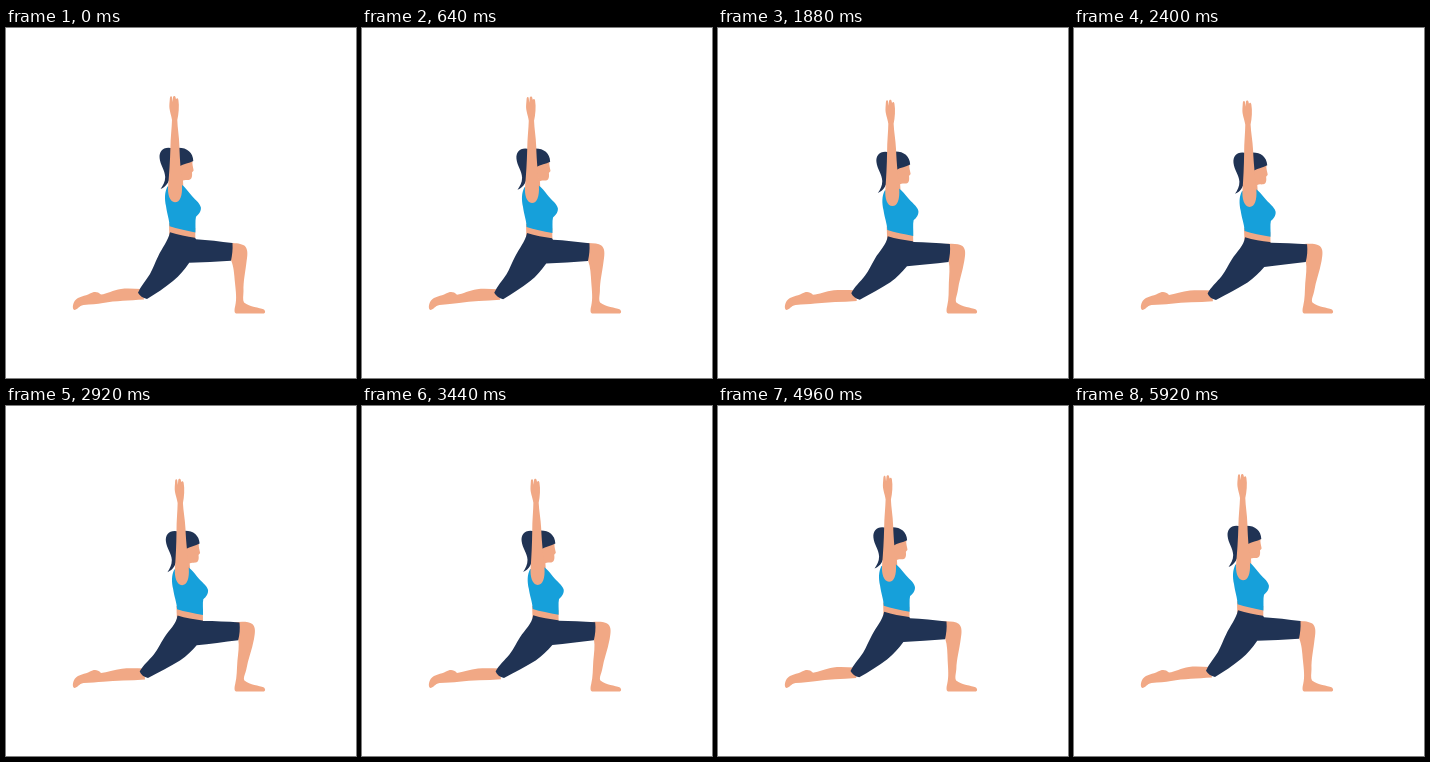
An HTML page for the animation above (6 s loop, 350 by 350 pixels).

```html
<!DOCTYPE html>
<html lang="en">
<head>
<meta charset="utf-8">
<title>Low lunge</title>
<style>
  html, body { margin: 0; width: 100%; height: 100%; overflow: hidden; background: #fff; }
  svg { display: block; width: 100%; height: 100%; }
  .skin { fill: #f1a885; }
  .navy { fill: #203354; }
  .top { fill: #16a0da; }
</style>
</head>
<body>
<svg viewBox="0 0 350 350">
  <path id="backLeg" class="skin"/>
  <path id="frontLeg" class="skin"/>
  <g id="body">
    <!-- ponytail, face, cap of hair -->
    <path class="navy" d="M167 120.5C157.5 118 153 123 153.6 130C154.2 137 159 142 159.2 149C159.2 154 157 157.5 154.6 161C161 158.8 163.8 152 165 146Z"/>
    <path class="skin" d="M172 135L186.5 133C186 136.5 187.2 139 187.6 142.2C187.5 143.4 186.2 143.6 186 144.6C186.4 148 186 151.6 183 151.9C180.5 152.2 178.5 151.4 177 152.6L177.4 160H170Z"/>
    <path class="navy" d="M165 121C177 117.5 187 122 187.3 133C183 135.5 178 135.5 173 138.5H165Z"/>
    <!-- waist and shirt -->
    <path class="skin" d="M163 195L189.3 200L189.3 213L163.3 209Z"/>
    <path class="top" d="M161.5 158.5C158.5 164 158.5 171 160 178C161 186 163.3 191 163.6 198.2C171 200.8 180 202.4 189.4 204.4C189.8 198 189 193 190 188.8C192.8 186.5 195.2 183.5 194.9 179.6C193.8 174.5 188 171 184.3 166C181.5 162.5 179 159 175.5 156.5Z"/>
    <!-- raised arm -->
    <path class="skin" d="M166 92C165.2 86 162.9 82 163.4 76L163.9 70C164.2 67.8 166 67.8 166.1 70L166.5 74L167 69.4C167.2 67.4 169.3 67.4 169.6 69.4L170 71.2C171 69.6 172.1 70.2 172.4 72C173.4 78 172.7 86 171.3 92C171.5 100 173.1 108 173.4 118C173.7 132 175.2 146 176 157C176.6 168 174 174.3 169 174.3C163.7 174 161.2 166 162.2 157C163.2 146 164 134 164.4 120C164.5 110 165.8 100 166 92Z"/>
  </g>
  <path id="pants" class="navy"/>
</svg>
<script>
  const STEP = 40, LOOP = 6000, HALF = 2960;

  // Each limb: upright pose and deepest pose, with the same path commands.
  const limbs = {
    backLeg: [
      "M136 261C129 261 122 260 115 261C107 262 101 266 95 266.6C91.5 263.2 87.5 263.5 84 265.6C79 268.4 72.5 268.2 68.8 272.8C66.3 277 66.3 281 68.3 282C71.2 282 73 277.8 77.5 277C85 276.5 91 276 97 275C110 272.6 123 272.6 138 271.5Z",
      "M138 262.5C131 262.5 123 262 116 262.7C108 263.5 101 266.6 95 266.9C91.5 263.2 87.5 263.5 84 265.6C79 268.4 72.5 268.2 68.8 272.8C66.3 277 66.3 281 68.3 282C71.2 282 73 277.8 77.5 277C85 276.5 91 276.4 97 275.8C110 274.2 124 274.6 139 273.4Z"
    ],
    frontLeg: [
      "M222 215C228 214.7 235 215.3 238.3 217.5C242 220.5 241.8 226 240.6 233C239.4 244 237.2 253 237.5 263C237.4 268 236.5 271.5 238 274.5C244 279 253 279.5 258 281.5C259.5 283 259.5 285 258 285.4H230C228 285 228.4 281 229.2 278C231 271 229.8 263 229 255C228.2 246 227.8 239 225.2 232.5Z",
      "M229 216.3C236 215.4 243 215.6 246.3 218C249.8 221 249.2 226 248 233C246 244 242 253 240.4 263C239.4 268 237 271.5 238.4 274.5C244 279 253 279.5 258 281.5C259.5 283 259.5 285 258 285.4H230C228 285 228.4 281 229.2 278C231 271 230.8 263 231.4 255C232.2 247 233.4 240 232.3 233.5Z"
    ],
    pants: [
      "M164 204.2C172 206.9 181 208.2 189 209.7L190 211.2C202 212 214 213.4 226.5 215C226.9 222 226.2 227 225 232.8C211 233.8 197 234.3 183.2 234.8C178.5 241.5 174 247.5 167 253C159 259.5 150 265.5 141 271C137 270.2 133.5 267.5 132 264.7C134.5 258.5 140 252.5 144 246C147 240.5 149 234.5 152.3 228C156 220 162 213 164 204.2Z",
      "M171.5 209.5C179.5 212 188 213.2 196.4 214.4L197.3 215C209 215 221 215.6 233.5 216.4C234.2 223 233.6 228.5 232.2 234.2C218 236 204 237.8 190.7 239.2C185.5 245 181 249.6 174 254.6C164 260.6 152.5 266.6 142 272C138 271.2 135 268.7 133.7 265.5C136.7 259.5 143 254.2 147.8 248.4C152.3 242.8 154.5 237.2 158.3 231.5C163 224 170.5 218 171.5 209.5Z"
    ]
  };

  const $ = id => document.getElementById(id);

  function mix(a, b, p) {
    const ends = b.match(/[\d.]+/g);
    let i = 0;
    return a.replace(/[\d.]+/g, n => (+n + (ends[i++] - n) * p).toFixed(2));
  }

  // Cubic bezier easing with flat ends, solved for x by bisection.
  function ease(x, x1, x2) {
    let lo = 0, hi = 1, s = 0.5;
    for (let i = 0; i < 24; i++) {
      s = (lo + hi) / 2;
      const u = 1 - s;
      if (3 * u * u * s * x1 + 3 * u * s * s * x2 + s ** 3 < x) lo = s; else hi = s;
    }
    return s * s * (3 - 2 * s);
  }

  function draw(now) {
    const t = Math.min(Math.floor((now % LOOP) / STEP) * STEP, 2 * HALF);
    const p = ease(1 - Math.abs(t - HALF) / HALF, 0.33, 0.55);
    for (const id in limbs) $(id).setAttribute("d", mix(...limbs[id], p));
    $("body").setAttribute("transform", `translate(${7.6 * p} ${4.8 * p}) rotate(${-p} 176 205)`);
  }

  let start;
  function tick(now) {
    start ??= now;
    draw(now - start);
    requestAnimationFrame(tick);
  }
  draw(0);
  requestAnimationFrame(tick);
</script>
</body>
</html>
```
